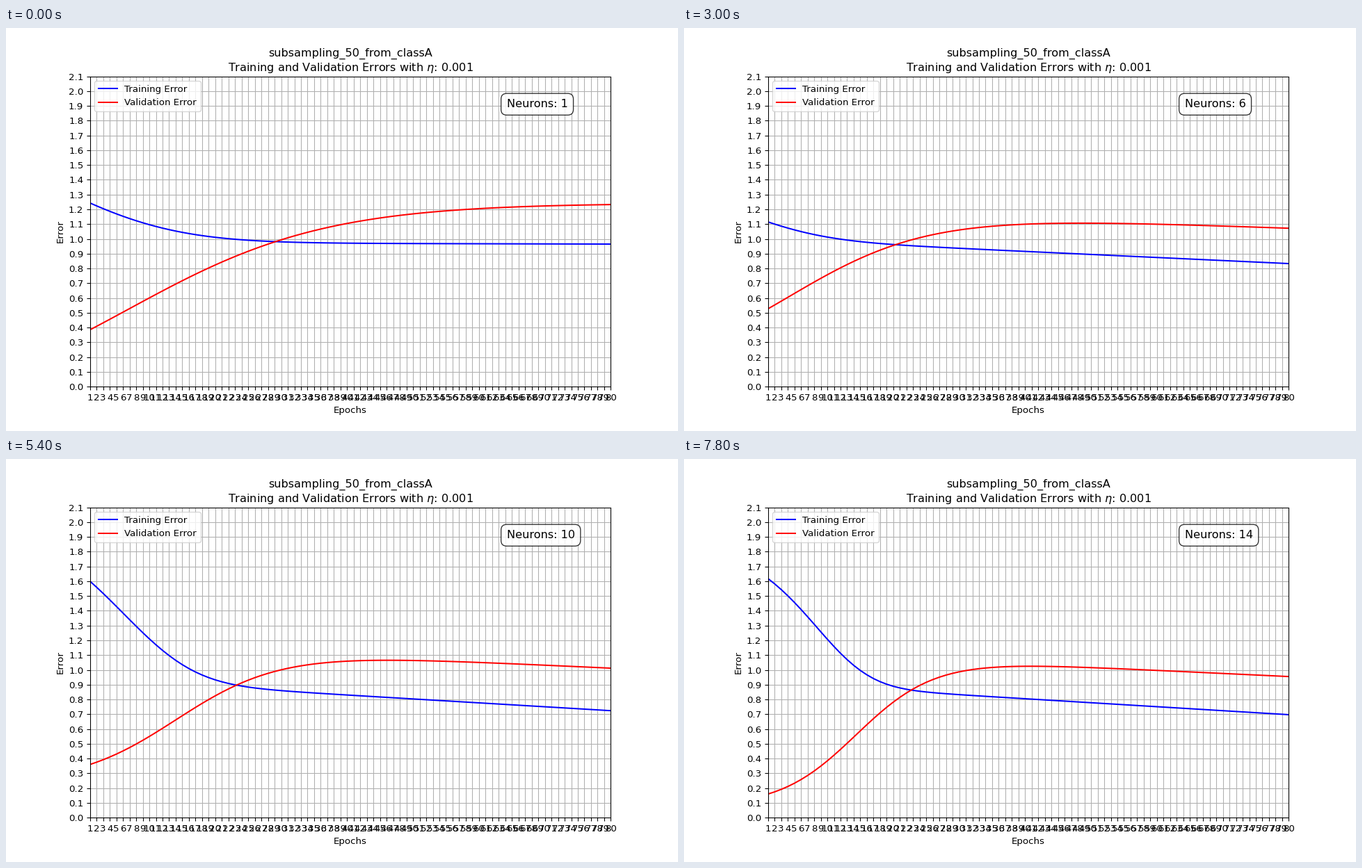
These frames come from a looping animation (966 px wide and 580 px high, 8000 ms). A matplotlib script:

```python
import numpy as np
import matplotlib.pyplot as plt
from matplotlib.animation import FuncAnimation

W, H, DPI = 966, 580, 96.6
STEP_MS, STEPS_PER_RUN, STEPS = 200, 3, 40

epochs = np.arange(1, 81)

# Validation error of each run before learning, for 1 to 14 neurons
VALID_START = [.385, .42, .168, .242, .55, .527, .117,
               .342, .25, .36, .13, .093, .19, .16]

# Key values at a few neuron counts, blended linearly in between
NEURONS = [1, 4, 6, 8, 10, 13, 14]
START_SUM = [1.628, 1.594, 1.642, 1.794, 1.96, 1.618, 1.778]
TRAIN_END = [.965, .871, .833, .726, .724, .638, .697]
VALID_END = [1.243, 1.102, 1.073, .976, 1.012, .901, .955]


def settle(start, end, slope, decay):
    """Move from start onto a straight tail that reaches end."""
    tail = end - slope * (epochs - epochs[-1])
    return tail + (start - tail[0]) * decay


def errors(neurons):
    """Training and validation error over all epochs."""
    start_sum, train_end, valid_end = (
        np.interp(neurons, NEURONS, key)
        for key in (START_SUM, TRAIN_END, VALID_END))
    valid_start = VALID_START[neurons - 1]
    train_start = start_sum - valid_start

    # A worse start delays the turn; more neurons make it sharper
    turn = 20 * train_start - 18
    width = 16 * np.exp(-0.07 * neurons)
    decay = 1 / (1 + np.exp((epochs - turn) / width))
    decay /= decay[0]

    slope = 0.0027 * (1 - np.exp(-(neurons / 5) ** 2))
    return (settle(train_start, train_end, slope, decay ** 2.7),
            settle(valid_start, valid_end, 0.78 * slope, decay))


plt.rcParams["font.family"] = "DejaVu Sans"
# The tiny margin keeps the pixel size from being rounded down
fig, ax = plt.subplots(figsize=((W + 1e-6) / DPI, (H + 1e-6) / DPI), dpi=DPI)
fig.subplots_adjust(left=0.125, right=0.9, bottom=0.11, top=0.88)

train, valid = errors(1)
train_line, = ax.plot(epochs, train, color="blue", label="Training Error")
valid_line, = ax.plot(epochs, valid, color="red", label="Validation Error")
ax.set(xlim=(1, 80), ylim=(0, 2.1), xticks=epochs,
       yticks=np.linspace(0, 2.1, 22), xlabel="Epochs", ylabel="Error")
ax.set_title("subsampling_50_from_classA\n"
             r"Training and Validation Errors with $\eta$: 0.001")
ax.grid(True)
ax.legend(loc="upper left")
label = ax.text(0.8, 0.9, "Neurons: 1", transform=ax.transAxes, fontsize=12,
                bbox=dict(boxstyle="round,pad=0.5", facecolor="white",
                          edgecolor="black", alpha=0.8))


def update(step):
    neurons = step // STEPS_PER_RUN + 1
    train, valid = errors(neurons)
    train_line.set_ydata(train)
    valid_line.set_ydata(valid)
    label.set_text(f"Neurons: {neurons}")
    return train_line, valid_line, label


anim = FuncAnimation(fig, update, frames=STEPS, interval=STEP_MS,
                     repeat=True, repeat_delay=0)
plt.show()
```
